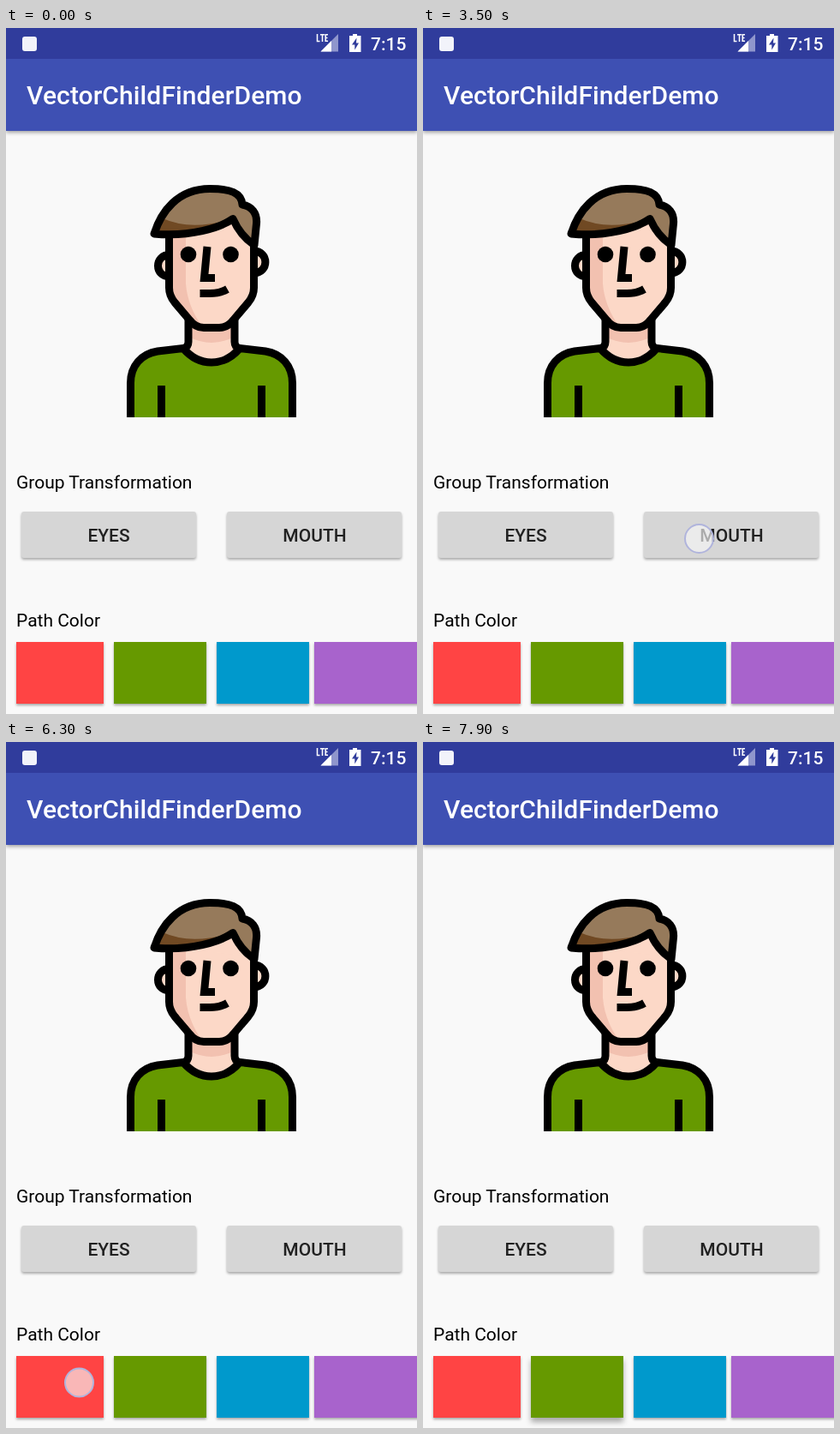
Write an HTML page that moves like this. It is 480x800 px and loops after 8 s.

```html
<!DOCTYPE html>
<html lang="en">
<head>
<meta charset="utf-8">
<title>VectorChildFinderDemo</title>
<style>
  html, body { margin: 0; width: 100%; height: 100%; overflow: hidden; background: #f9f9f9; }
  svg { display: block; width: 100%; height: 100%; }
  text { font-family: Roboto, sans-serif; font-size: 21px; }
  .medium { font-weight: 500; }
  .title { font-size: 30px; letter-spacing: .1px; }
  .line { fill: none; stroke: #000; stroke-width: 9; }
  .raise { filter: drop-shadow(0 2px 1.5px rgba(0, 0, 0, .32)); }
</style>
</head>
<body>
<svg viewBox="0 0 480 800">
  <defs>
    <path id="body" d="M145.5 454V414C145.5 394 158 380 177 377L207 373.5Q221 390 240 390T273 373.5L303 377C322 380 334.5 394 334.5 414V454"/>
    <path id="hair" d="M173 240C181 215 200 187.5 238 187.5C262 187.5 275 192 276 206C287 208 293.5 216 292.5 228L290 253C279 246 271 236 265 222.5C250 233 215 244 173 240Z"/>
    <path id="face" d="M190.5 240V303Q190.5 312 197 320L214 340Q221 349.5 231 349.5H249Q259 349.5 266 340L283 320Q289.5 312 289.5 303V250"/>
  </defs>

  <!-- bars -->
  <rect y="36" width="480" height="84" fill="#3e50b3" style="filter:drop-shadow(0 2px 2px rgba(0,0,0,.35))"/>
  <rect width="480" height="36" fill="#303c9c"/>
  <rect x="19" y="10" width="17" height="17" rx="3" fill="#f2f3fa"/>
  <path d="M363.5 7V15.5H366.5M367 7.7H372M369.5 7.7V16M376 7.7H373.2V15.3H376M373.2 11.5H375.5" fill="none" stroke="#fff" stroke-width="1.5"/>
  <path d="M388 7V27.5H367.5Z" fill="#8f96cc"/>
  <path d="M380 15V27.5H367.5Z" fill="#fff"/>
  <path d="M405 7H410V9H414.5V28H401V9H405Z" fill="#fff"/>
  <path d="M409.5 11.5L404 19.5H407.3V25.5L412 17.5H409Z" fill="#303c9c"/>
  <text class="medium" x="426" y="26" fill="#fff">7:15</text>
  <text class="medium title" x="24" y="89" fill="#fff">VectorChildFinderDemo</text>

  <!-- portrait -->
  <path d="M213 335H267V366Q267 372 272 374L240 390L208 374Q213 372 213 366Z" fill="#fcd8c7"/>
  <path d="M213 340H267V360Q240 374 213 360Z" fill="#f2c1b0"/>
  <use id="shirt" href="#body"/>
  <use class="line" href="#body"/>
  <path class="line" d="M181.5 454V417M298.5 454V417"/>
  <path class="line" d="M213 338V366Q213 372 207 374M267 338V366Q267 372 273 374"/>
  <path class="line" style="fill:#fcd8c7" d="M191 264.5C173 264.5 173 290 191 290M289 260C307.5 260 307.5 286 289 286"/>
  <path d="M190 241L265 215L290 251Z" fill="#fcd8c7"/>
  <use href="#face" fill="#fcd8c7"/>
  <path d="M190.5 238H210V298Q212 325 230 349.5Q221 349.5 214 340L197 320Q190.5 312 190.5 303Z" fill="#f2c1b0"/>
  <use class="line" href="#face"/>
  <use href="#hair" fill="#967a5b"/>
  <path d="M173 240Q177 230 183 222Q216 237 265 222.5C250 233 215 244 173 240Z" fill="#704923"/>
  <use class="line" href="#hair" stroke-linejoin="round"/>
  <g id="eyes">
    <circle cx="213" cy="264" r="9.3"/>
    <circle cx="262.5" cy="264" r="9.3"/>
  </g>
  <path class="line" d="M235 255L231.5 291.5H244"/>
  <path id="mouth" class="line" d="M226.5 309.5H238Q250 309.5 258.5 304.5"/>

  <!-- controls -->
  <text x="12" y="537">Group Transformation</text>
  <text x="12" y="698">Path Color</text>
  <rect id="eyesBtn" class="raise" x="18" y="564" width="204" height="54" rx="3" fill="#d6d6d6"/>
  <rect id="mouthBtn" class="raise" x="258" y="564" width="204" height="54" rx="3" fill="#d6d6d6"/>
  <g class="medium" text-anchor="middle" fill="#212121">
    <text x="120" y="599">EYES</text>
    <text x="360.5" y="599">MOUTH</text>
  </g>
  <rect id="red" class="raise" x="12" y="716" width="102" height="72" fill="#ff4444"/>
  <rect id="green" class="raise" x="126" y="716" width="108" height="72" fill="#669900"/>
  <rect class="raise" x="246" y="716" width="108" height="72" fill="#0099cc"/>
  <rect class="raise" x="360" y="716" width="126" height="72" fill="#a863cc"/>

  <circle id="touch" r="16.5" fill="#f6f6f6" fill-opacity=".65" stroke="#b0b4dc" stroke-width="2"/>
</svg>
<script>
const LOOP = 8000;
const el = id => document.getElementById(id);

const spots = { eyesBtn: [106, 596], mouthBtn: [322.5, 595.5], red: [85.5, 747], green: [168, 754] };

// A finger rests from down to up; the control reacts at act and stays lifted for a while.
const taps = [
  { id: 'eyesBtn', down: 500, up: 800, act: 1000, lift: 500 },
  { id: 'eyesBtn', down: 1500, up: 1600, act: 1800, lift: 600 },
  { id: 'mouthBtn', down: 3500, up: 3700, act: 3900, lift: 400 },
  { id: 'mouthBtn', down: 4500, up: 4800, act: 5100, lift: 0 },
  { id: 'red', down: 6300, up: 6500, act: 6500, lift: 700 },
  { id: 'green', down: 7500, up: 7700, act: 7700, lift: 700 }
];

const shift = (id, x) => el(id).setAttribute('transform', `translate(${x} 0)`);

function drawControl(id, t) {
  const tap = taps.find(p => p.id === id && t >= p.act && t < p.act + p.lift);
  const k = tap ? Math.sin(Math.PI * (t - tap.act) / tap.lift) ** 2 : 0;
  el(id).style.filter = `drop-shadow(0 ${2 + 5 * k}px ${1.5 + 3 * k}px rgba(0,0,0,.32))`;
  if (id.endsWith('Btn')) el(id).setAttribute('fill', tap ? '#cecece' : '#d6d6d6');
}

function drawTouch(t) {
  const tap = taps.find(p => t >= p.down && t < p.up);
  el('touch').setAttribute('visibility', tap ? 'visible' : 'hidden');
  if (!tap) return;
  const fade = (t - tap.down) / (tap.up - tap.down);
  el('touch').setAttribute('transform', `translate(${spots[tap.id]})`);
  el('touch').setAttribute('opacity', 1 - fade ** 2);
}

function draw(t) {
  const done = taps.filter(p => p.act <= t);
  const toggled = id => done.filter(p => p.id === id).length % 2;
  shift('eyes', -5 * toggled('eyesBtn'));
  shift('mouth', -5.5 * (toggled('mouthBtn')));
  const swatch = done.findLast(p => !p.id.endsWith('Btn'))?.id ?? 'green';
  el('shirt').setAttribute('fill', el(swatch).getAttribute('fill'));
  for (const id in spots) drawControl(id, t);
  drawTouch(t);
}

const begin = performance.now();
function tick() {
  draw((performance.now() - begin) % LOOP);
  requestAnimationFrame(tick);
}
tick();
</script>
</body>
</html>
```
